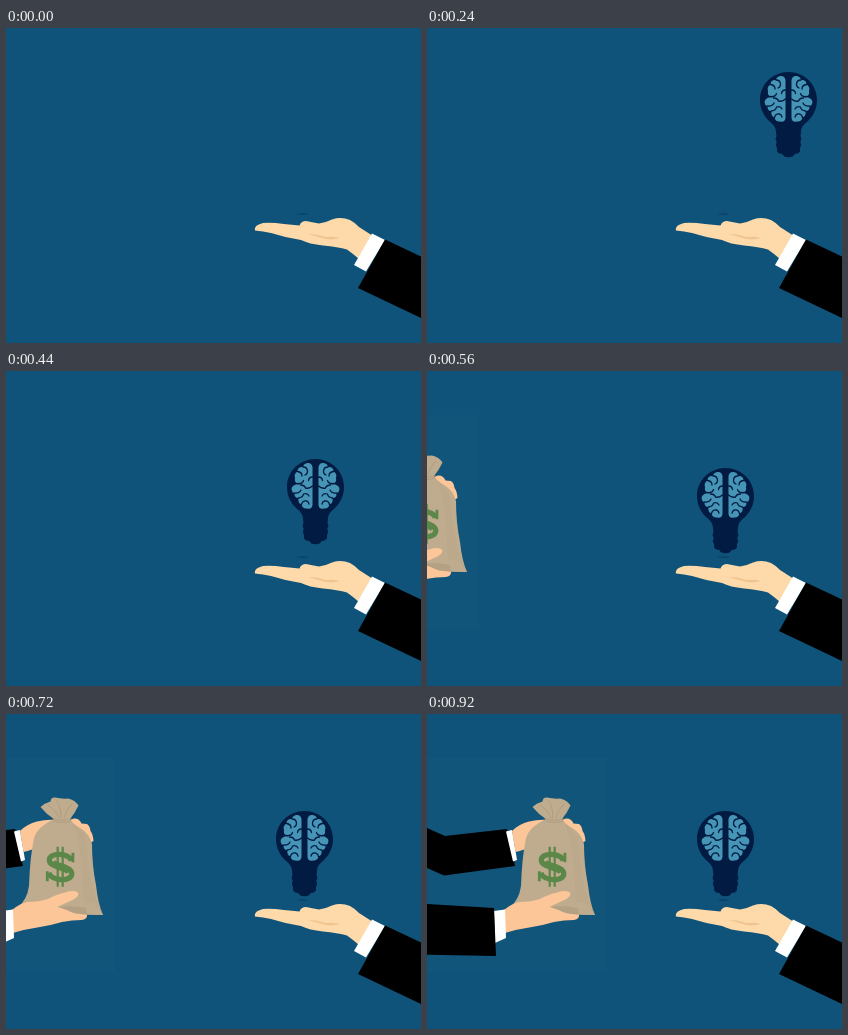
An HTML page that plays this animation: 415 px wide and 315 px high, repeating every 1120 ms.

```html
<!DOCTYPE html>
<html lang="en">
<head>
<meta charset="utf-8">
<title>Idea for money</title>
<style>
html, body { margin: 0; width: 100%; height: 100%; overflow: hidden; background: #0f537a; }
svg { display: block; width: 100%; height: 100%; }
.skin { fill: #fdc698; }
.cuff { fill: #fff; }
.fold { fill: none; stroke: #021b42; stroke-width: 1.3; stroke-linecap: round; stroke-linejoin: round; }
.crease { fill: none; stroke: #ae9a7c; stroke-width: .9; stroke-linecap: round; }
.green { fill: none; stroke: #5b8749; }
</style>
</head>
<body>
<svg viewBox="0 0 415 315" preserveAspectRatio="none">
  <defs>
    <g id="half">
      <path fill="#4695b6" d="M-3 -20 Q-4 -24.500 -8 -24 Q-12 -23.500 -12.500 -20 Q-18 -20.500 -18 -15.500 Q-22 -13 -20.500 -9 Q-21.500 -4.500 -17.500 -3.500 L-15 -2 Q-18 -3.500 -21 -2 Q-25 0 -23.500 4 Q-23 6 -21 6 Q-21.500 11 -17 11 Q-18 16 -14 17.500 Q-13 22 -8.500 21.500 Q-4 23 -3 18 Z"/>
      <path class="fold" d="M-12.500 -20 Q-8 -20 -8 -15.500 Q-8 -13 -10.500 -12 M-18 -15.500 Q-13.500 -15 -13.500 -11 M-3 -10 Q-6.500 -10 -7 -6.500 M-18 -3.500 Q-13 -3 -12 -6.500 M-15 -2 Q-11 -2 -10 1 Q-6 2 -3 -1 M-21 6 Q-16 6.500 -14.500 3 M-17 11 Q-12.500 10.500 -12 7 Q-8 5.500 -6.500 9 M-14 17.500 Q-13 13.500 -9 14 Q-7 14.500 -6.500 17"/>
    </g>
  </defs>

  <path fill="#0b4365" d="M290 186 Q296 184.500 303 186 Q298 187.800 290 186 Z"/>

  <g id="bulb">
    <path fill="#021b42" d="M298.500 97 C314 97 327 109 327 125 C327 134 323 141 318 146 C313 150 311 153 311 157 L310.500 161 L311.500 164 L310.300 167 L311.200 170 L310 173 L310 176 Q309 179 304.500 179 Q303.500 182.300 298.500 182.300 Q293.500 182.300 292.500 179 Q288 179 287 176 L287 173 L285.800 170 L286.700 167 L285.500 164 L286.500 161 L286 157 C286 153 284 150 279 146 C274 141 270 134 270 125 C270 109 283 97 298.500 97 Z"/>
    <g transform="translate(298.500 125)">
      <use href="#half"/>
      <use href="#half" transform="scale(-1 1)"/>
    </g>
  </g>

  <g>
    <path fill="#fed9a9" d="M249 202.500 Q247.500 197.500 257 195 Q266 194.300 278 196 L293.500 197.500 Q295 193 300 193 Q306 194 313 195.500 Q320 194.500 326 191.500 Q335 188.500 344 192 Q348 194 353 199 L367 208 L353 231 Q346 225 341 221.500 Q332 219 317 217.500 Q303 216 295 212 Q279 209.500 265 205 Q257 203 249 202.500 Z"/>
    <path d="M302 206 Q312 206 319 209 Q326 208 334 210 Q324 213 314 209.500 Z" fill="#efc491"/>
    <path class="cuff" d="M366 205.500 L379 212 L360 243.500 L348 237 Z"/>
    <path d="M379 211.500 L415 228.500 V290 L352 260 Z"/>
  </g>

  <g id="bag">
    <rect x="-20" y="44" width="200" height="214" fill="#fff" opacity=".012"/>
    <path d="M-10 110 L0 114 L18 122 L80 115 L88 152 L17 161.500 L0 154 L-10 150 Z"/>
    <path class="cuff" d="M79 117.500 L85 116 L90 146 L86 147.500 Z"/>
    <path class="skin" d="M85 117 Q92 110 102 107.500 Q112 105 122 106 L130 118 L108 132 Q96 136 88.500 138 Z"/>
    <path class="skin" d="M132 107 L139 104.500 Q144 104 146.500 109.500 L152 110 Q155 112 155.500 117 Q158 120 158.500 127 L150 132 L134 118 Z"/>
    <path fill="#bfac8e" d="M119 105 Q111 100 105.500 93 Q110 89 115.500 87.500 Q116 83 120 83.500 Q126 85 133 84.500 Q140 86 143.500 91.500 Q140 99 135 105 Q137 109 145 114 Q154 119 157 130 Q157 151 161 171 Q163 190 168 201 Q152 200 138 201 Q110 198 92 199 L83 193 Q92 186 94 172 Q95 143 99 124 Q102 113 119 105 Z"/>
    <path fill="#b4a082" opacity=".35" d="M138 111 Q151 116 152 135 Q154 174 168 201 L149 200 Q149 158 144 132 Q142 118 138 111 Z"/>
    <path class="crease" d="M118 104.500 Q127 108 136 104.500 M119 107 Q127 110 136 107 M113 91 Q121 96 124 104 M122 87 Q126 94 126 104 M137 90 Q131 96 129 104"/>
    <g transform="translate(125.300 152.800)" class="green">
      <path stroke-width="2.200" d="M-2.600 -20 V20 M2.400 -20 V20"/>
      <path stroke-width="5.200" d="M11 -6 C9 -14 -11 -15 -11 -6.500 C-11 2 11.500 -2.500 11.500 7 C11.500 15.500 -9 14.500 -11.500 6"/>
      <path stroke-width="7.500" d="M-8 -4 C-4 0 4 0 9 4"/>
      <path stroke-width="2.800" d="M12.600 -14 V-4.500 M-13 4.500 V14.500"/>
    </g>
    <path class="skin" d="M77 196 Q84 190 92 188 Q104 188 113 185 Q122 180 130 178.500 Q142 175 143.500 180 Q143 184 134 187.500 Q127 191 122 193 Q137 193 142 197 L152 200 Q153 205 147 206 Q137 206 127 208 Q117 211 105 213 Q91 215 78 219 Z"/>
    <path fill="#bfac8e" d="M123 193 Q131 190 137 187 L158 189 L168 201 L150 200.500 Q138 200 132 196 Z"/>
    <path fill="#b4a082" d="M124 193 Q138 191 151 194 L152 200.500 Q139 200 132 196 Z"/>
    <path class="cuff" d="M67 197 L78 195.500 L79 224 L68 229 Z"/>
    <path d="M-10 189.500 L0 190 L67 194 L69 242 L-10 240.500 Z"/>
  </g>
</svg>
<script>
const LOOP = 1120, TICK = 40;

// Slide a part to its resting place in equal ticks; parked off stage before that.
function slide(id, start, end, dx, dy) {
  const steps = (end - start) / TICK;
  const keys = [{ offset: 0, transform: 'translate(-900px, 0px)', easing: 'step-end' }];
  for (let i = 0; i <= steps; i++) {
    const left = steps - i;
    keys.push({
      offset: (start + i * TICK) / LOOP,
      transform: `translate(${Math.round(dx * left)}px, ${Math.round(dy * left)}px)`,
      easing: 'step-end'
    });
  }
  keys.push({ offset: 1, transform: 'translate(0px, 0px)' });
  document.getElementById(id).animate(keys, { duration: LOOP, iterations: Infinity });
}

slide('bulb', 120, 480, 10.5, -8.85);
slide('bag', 520, 920, -14.25, 0);
</script>
</body>
</html>
```
